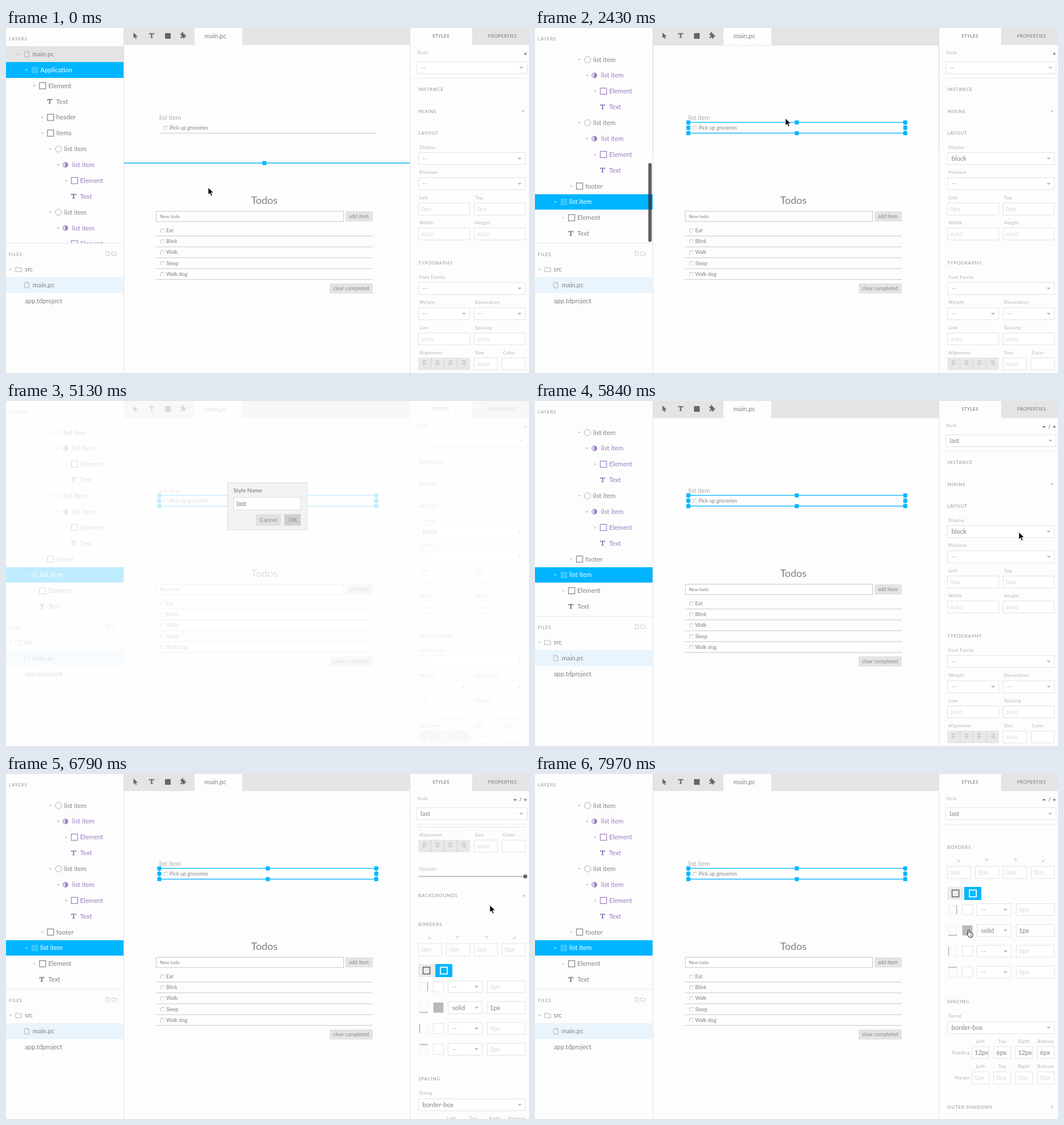
These frames come from a looping animation (921x608 px, 8000 ms). An HTML page:

```html
<!DOCTYPE html>
<html lang="en">
<head>
<meta charset="utf-8">
<title>Component editor</title>
<style>
html, body { margin: 0; width: 100%; height: 100%; overflow: hidden; background: #fdfdfd; }
svg { display: block; width: 100vw; height: 100vh; font-family: Lato, "Open Sans", sans-serif; }
.cap { letter-spacing: .8px; }
.lab { letter-spacing: .45px; }
</style>
</head>
<body>
<svg id="stage" viewBox="0 0 921 608" preserveAspectRatio="none"></svg>
<script>
const LOOP = 8000, BLUE = '#00b5ff', PURPLE = '#9a7cc0', GRAY = '#828282', PALE = '#dadada', EDGE = '#e2e2e2';
const RULE = '#c6c6c6', ROW = 27.87, TREE_SCROLL = 492;

// Drawing helpers; text y is the middle of the capitals.
const text = (s, x, y, size = 11.3, fill = GRAY, more = '') =>
  `<text x="${x}" y="${y + size * .35}" font-size="${size}" fill="${fill}" ${more}>${s}</text>`;
const cap = (s, x, y, fill = '#969696') => text(s, x, y, 8, fill, 'class="cap"');
const label = (s, x, y, more = '') => text(s, x, y, 8, '#afafaf', 'class="lab" ' + more);
const box = (x, y, w, h, fill, more = '') =>
  `<rect x="${x}" y="${y}" width="${w}" height="${h}" fill="${fill}" ${more}/>`;
const frame = (x, y, w, h, stroke = EDGE, fill = 'none', sw = 1) =>
  box(x + .5, y + .5, w - 1, h - 1, fill, `stroke="${stroke}" stroke-width="${sw}"`);
const path = (d, fill, more = '') => `<path d="${d}" fill="${fill}" ${more}/>`;
const line = (d, stroke, w = 1) => path(d, 'none', `stroke="${stroke}" stroke-width="${w}"`);
const at = (x, y, body, scale = 1) => `<g transform="translate(${x} ${y}) scale(${scale})">${body}</g>`;
const group = (id, body, more = '') => `<g id="${id}" ${more}>${body}</g>`;
const plus = (x, y, c = '#999') => line(`M${x - 2.5} ${y}h5M${x} ${y - 2.5}v5`, c);

const icons = {
  doc: c => line('M-3.5-5h5l2.5 2.5v7.5h-7.5zM1.5-5v2.5h2.5', c, .9),
  folder: c => line('M-5-4h4l1 1.5h5.5v6.5h-10.5z', c, .9),
  frame: c => frame(-6, -6, 12, 12, c, 'none', 1.2),
  comp: c => [[-5, -5], [1, -5], [-5, 1], [1, 1]].map(([x, y]) => frame(x, y, 4.5, 4.5, c, 'none', .9)).join(''),
  circle: c => `<circle r="5.5" fill="none" stroke="${c}"/>`,
  half: c => `<circle r="4.5" fill="#ddd4ea" stroke="${c}" stroke-width=".8"/>` + path('M0-4.5a4.5 4.5 0 0 1 0 9z', c),
  text: c => path('M-4.5-4.5h9v2.8h-1.2v-1.2h-2.2v5.9h1.2v1h-4.6v-1h1.2v-5.9h-2.2v1.2h-1.2z', c)
};
const twist = (x, y, open, c = '#cacaca') =>
  at(x, y, path(open ? 'M-2.7-1.3h5.4l-2.7 3.2z' : 'M-1.3-2.7v5.4l3-2.7z', c));

// Layer rows: name, depth, icon, open (undefined means no twist).
const instance = [['list item', 4, 'circle', 1], ['list item', 5, 'half', 1], ['Element', 6, 'frame', 0], ['Text', 6, 'text']];
const layers = [
  ['main.pc', 0, 'doc', 1], ['Application', 1, 'comp', 1], ['Element', 2, 'frame', 1], ['Text', 3, 'text'],
  ['header', 3, 'frame', 0], ['items', 3, 'frame', 1],
  ...Array(5).fill(instance).flat(),
  ['footer', 3, 'frame', 0], ['list item', 1, 'comp', 1], ['Element', 2, 'frame', 0], ['Text', 2, 'text']
];
const tree = (selected, scroll) => layers.map(([name, depth, icon, open], i) => {
  const y = 46 + i * ROW - scroll, x = 22 + depth * 14;
  const top = Math.round(y - ROW / 2), bottom = Math.round(y + ROW / 2);
  const on = i === selected, c = on ? '#fff' : depth > 4 ? PURPLE : GRAY;
  const bg = on ? BLUE : i === 0 ? '#e4e4e4' : '';
  const soft = on ? '#8fdcff' : icon === 'doc' || icon === 'circle' ? '#acacac' : c;
  return (bg ? box(0, top, 207.5, bottom - top, bg) : '') +
    (open === undefined ? '' : twist(x, y, open, on ? '#7fd6ff' : undefined)) +
    at(x + (icon === 'half' ? 12.5 : icon === 'text' ? 13 : 14.5), y, icons[icon](soft)) +
    text(name, x + 24.5, y, 11.3, c);
}).join('');

const sidebar = () => cap('LAYERS', 5, 19) +
  group('treeA', tree(1, 0), 'clip-path="url(#treeClip)"') +
  group('treeB', tree(27, TREE_SCROLL), 'clip-path="url(#treeClip)"') +
  box(199.5, 238, 6, 139, '#2d2d2d', 'id="bar" rx="3" opacity=".7"') +
  line('M0 379.5H207', '#e8e8e8') + cap('FILES', 5, 399) +
  at(179, 397.5, icons.doc('#b4b4b4'), .75) + at(190, 397.5, icons.folder('#b4b4b4'), .75) +
  twist(8, 425.5, 1) + at(22, 425.5, icons.folder('#acacac')) + text('src', 33, 425.5) +
  box(0, 439, 207, 28, '#e9f4fc') + at(36.5, 453, icons.doc('#acacac')) + text('main.pc', 47, 453) +
  text('app.tdproject', 33, 481) + line('M207.5 0V608', '#e2e2e2');

const checkbox = (x, y) => frame(x - 3.5, y - 3, 7, 7, '#eaeaea') + line(`M${x - 3} ${y + 3}v-4q0-2 2-2h4`, '#c0c0c0');
const button = (x, y, w, h, s, tx, size = 9.1, fill = '#e4e4e4') =>
  box(x, y, w, h, fill) + text(s, tx, y + h / 2, size, '#8a8a8a');

const canvasArea = () => box(208, 0, 503, 30, '#e4e4e4') + box(332, 0, 84, 30, '#fdfdfd') +
  at(224.5, 8, path('M0 0v10l2.4-2.2 1.5 3.4 1.7-.7-1.5-3.3h3.3z', '#666')) +
  at(256.5, 13.5, icons.text('#666')) + box(280, 9, 10, 10, '#666') +
  path('M307 10h2.6q-1-3 1-3t1 3h3v3q2.6-1 2.6 1.2t-2.6 1v3h-2.6q.4-2-1.2-2t-1.2 2h-2v-3q2 .4 2-1.2t-2-1.2z', '#666') +
  text('main.pc', 349.5, 14) +
  text('list item', 270, 158, 11, '#adadad') + checkbox(281.5, 176) +
  text('Pick up groceries', 288, 175.5, 9.1) + line('M270 185.3H652', RULE) +
  text('Todos', 455, 304, 18, GRAY, 'text-anchor="middle"') +
  frame(264, 322.5, 331, 19, RULE, '#fff') + text('New todo', 271, 332.5, 8.1) +
  button(598, 323, 48, 18, 'add item', 604) +
  ['Eat', 'Blink', 'Walk', 'Sleep', 'Walk dog'].map((s, i) => {
    const y = 357 + i * 19.15;
    return checkbox(275.5, y) + text(s, 282, y, 9.1) + line(`M264 ${y + 9.6}H646`, RULE);
  }).join('') +
  button(570, 450, 76, 18, 'clear completed', 576);

const field = (x, y, w, s, c = PALE) => frame(x, y - 11, w, 22, EDGE, '#fff') + text(s, x + 5, y, 11.2, c);
const select = (x, y, w, s = '--', c = '#a8a8a8') =>
  frame(x, y - 11, w, 22, EDGE, '#fff') + text(s, x + 7.5, y, 11.2, c) +
  path(`M${x + w - 14} ${y - 1.5}h7l-3.5 3.5z`, '#b8b8b8');

const alignIcons = () => [0, 1, 2, 3].map(i => {
  const x = 737 + i * 23;
  const rows = [7, 4, 7, 4].map((w, r) => {
    const shift = i === 1 ? (7 - w) / 2 : i === 3 ? 7 - w : 0;
    return `M${x - 3.5 + shift} ${586.5 + r * 2.5}h${w}`;
  }).join('');
  return line(rows, '#b0b0b0', .9) + (i ? line(`M${x - 11.5} 581v22`, '#d2d2d2') : '');
}).join('');

const columns = [726, 775, 824, 873];
const sideMarks = ['M742.5-8v16', 'M728 8.5h15', 'M728.5-8v16', 'M728-8.5h15'];
const borderRow = i => {
  const y = 840 + i * 36.7, set = i === 1;
  return frame(728, y - 8, 15, 17, '#ececec') + at(0, y, line(sideMarks[i], '#b0b0b0', 1.5)) +
    frame(752, y - 9.5, 19, 19, EDGE, set ? '#b9b9b9' : '#fff') +
    select(778, y, 61, set ? 'solid' : '--', set ? GRAY : undefined) +
    field(847, y, 68, set ? '1px' : '0px', set ? GRAY : undefined);
};
const edges = (name, y, values, c) => label(name, 766, y, 'text-anchor="end"') +
  ['Left', 'Top', 'Right', 'Bottom'].map((s, i) => {
    const x = 769 + i * 38.3;
    return label(s, x + 15.5, y - 20, 'text-anchor="middle"') + field(x, y, 31, values[i], c);
  }).join('');

const properties = () =>
  cap('INSTANCE', 726, 108) + cap('MIXINS', 726, 147) + plus(910.5, 146.5, '#c0c0c0') + cap('LAYOUT', 726, 185.5) +
  label('Display', 728, 210) + select(726, 230, 189, '') +
  group('dash', text('--', 733.5, 230, 11.2, '#a8a8a8')) + group('block', text('block', 733.5, 230, 11.2)) +
  label('Position', 728, 254) + select(726, 274.5, 189) +
  [['Left', 'Top', 299, '0px'], ['Width', 'Height', 343, 'auto']].map(([a, b, y, s]) =>
    label(a, 728, y) + label(b, 826, y) + field(726, y + 20, 91, s) + field(824, y + 20, 91, s)).join('') +
  cap('TYPOGRAPHY', 726, 414.5) + label('Font Family', 728, 439) + select(726, 459, 189) +
  label('Weight', 728, 483.5) + label('Decoration', 826, 483.5) + select(726, 503.5, 91) + select(824, 503.5, 91) +
  label('Line', 728, 528) + label('Spacing', 826, 528) + field(726, 548, 91, 'auto') + field(824, 548, 91, 'auto') +
  label('Alignment', 728, 572) + label('Size', 826, 572) + label('Color', 875, 572) +
  box(726, 581, 91, 22, '#e8e8e8') + alignIcons() + field(824, 592, 42, 'auto') + field(873, 592, 42, '') +
  label('Opacity', 728, 632) + line('M726 645.5H915', '#c0c0c0', 2) + '<circle cx="914.5" cy="645.5" r="3.5" fill="#666"/>' +
  cap('BACKGROUNDS', 726, 679.5) + plus(912, 679.5, '#c0c0c0') + cap('BORDERS', 726, 730.5) +
  ['v4h4', 'v-4h4', 'v-4h-4', 'v4h-4'].map((d, i) =>
    line(`M${columns[i] + (i < 2 ? 19 : 23)} ${d[1] === '-' ? 755 : 751}${d}`, '#b4b4b4') + field(columns[i], 774.5, 42, '0px')).join('') +
  box(726, 800, 30, 23, '#ececec') + box(756, 800, 30, 23, BLUE) +
  frame(734, 805, 13, 13, '#707070', 'none', 1.8) + frame(764.5, 805, 13, 13, '#fff', 'none', 1.8) +
  [0, 1, 2, 3].map(borderRow).join('') +
  cap('SPACING', 726, 1002.5) + label('Sizing', 728, 1027.5) + select(726, 1048, 189, 'border-box', GRAY) +
  edges('Padding', 1092, ['12px', '6px', '12px', '6px'], GRAY) +
  edges('Margin', 1136.5, ['0px', '0px', '0px', '0px']) +
  cap('OUTER SHADOWS', 726, 1188.5) + plus(910.5, 1188, '#c0c0c0');

const inspector = () => box(821, 0, 100, 30, '#e4e4e4') + line('M711.5 0V608', '#e2e2e2') +
  text('STYLES', 766, 14.5, 8, '#666', 'class="lab" text-anchor="middle"') +
  text('PROPERTIES', 874.5, 14.5, 8, '#777', 'class="lab" text-anchor="middle"') +
  label('Style', 724, 43) + plus(914.5, 45.5, '#666') +
  group('minus', line('M894 45.5h5', '#444', 1.5) + line('M904.5 48.5l3-7', '#888')) +
  select(723, 70, 195, '') + group('noStyle', text('--', 730, 70, 11.2, '#a8a8a8')) + group('lastStyle', text('last', 730, 70, 11.2)) +
  line('M712 88.5H921', '#eee') +
  `<g clip-path="url(#panelClip)">${group('panel', properties())}</g>`;

const handle = (x, y) => box(x - 3.5, y - 3.5, 7, 7, BLUE);
const overlays = () =>
  group('pickApp', line('M208 238H711', BLUE, 1.3) + handle(455, 238)) +
  group('hoverArt', line('M208.5 213V30.5H710.5V213', '#5fb4ff')) +
  group('hoverText', frame(288, 169, 67, 13, BLUE)) +
  group('hoverItem', frame(270, 166, 383, 20, BLUE)) +
  group('pickItem', box(270, 166.3, 382, 19, 'none', `stroke="${BLUE}" stroke-width="1.3"`) +
    [270, 461, 652].map(x => [166.3, 175.8, 185.3].map(y => x === 461 && y === 175.8 ? '' : handle(x, y)).join('')).join(''));

const dialog = () => box(0, 0, 921, 608, '#fff', 'id="veil"') +
  group('dialog', frame(389.5, 143.5, 141, 84, '#dadada', '#f3f3f3') + text('Style Name', 400.5, 157, 10.1, '#707070') +
    frame(400.5, 169.5, 119, 23, '#dcdcdc', '#fff') + text('', 406, 181, 11.2, '#707070', 'id="typed"') +
    button(440, 199.5, 44, 20, 'Cancel', 446.5, 10.3, '#e0e0e0') + button(490, 199.5, 29, 20, 'OK', 497.5, 10.3, '#cfcfcf'));

const pointers = () => group('pointer',
  group('arrow', path('M0 0v13l3-2.8 2.1 5 2.3-1-2.1-4.8h4.1z', '#000', 'stroke="#fff" stroke-width=".9"')) +
  group('beam', line('M-2.5-6q2 0 2.5 1 .5-1 2.5-1M0-5V5M-2.5 6q2 0 2.5-1 .5 1 2.5 1M-1.5 2h3', '#222', 1.2)) +
  group('hand', path('M-1.5.8q1.4-1.8 2.8 0v4q1-.8 1.9.3 1-.6 1.8.5 1.7-.4 2 1.2v2.4l-1 3.3h-5.8l-3.7-5.2q.2-1.6 1.7-.8l.3.4z', '#fff', 'stroke="#111"') +
    line('M2.3 8v2.5M4.3 8v2.5', '#333', .8)));

const clip = (id, x, y, w, h) => `<clipPath id="${id}">${box(x, y, w, h, '#000')}</clipPath>`;
const stage = document.getElementById('stage');
stage.innerHTML = `<defs>${clip('treeClip', 0, 32, 207.5, 347)}${clip('panelClip', 712, 89, 209, 519)}</defs>` +
  box(0, 0, 921, 608, '#fdfdfd') + sidebar() + canvasArea() + inspector() + overlays() + dialog() + pointers();
const part = Object.fromEntries([...stage.querySelectorAll('[id]')].map(el => [el.id, el]));

// Step tables: each value holds until the next time.
const pointerSteps = [
  [0, 356, 281], [270, 356, 280], [420, 355, 276], [540, 352, 262], [660, 348, 240], [770, 343, 220], [890, 339, 205],
  [1010, 337, 195], [1120, 336, 189], [1240, 335, 187], [1350, 334, 184], [1620, 370, 191], [1740, 415, 184],
  [1860, 440, 168], [2310, 441, 159], [2670, 450, 157], [2790, 500, 145], [2900, 600, 120], [3020, 730, 90],
  [3140, 840, 65], [3260, 900, 50], [3370, 915, 46], [4420, 0, 0, ''], [5460, 911, 50], [5660, 879, 105],
  [5840, 852, 231], [7140, 850, 236, 'beam'], [7260, 848, 238, 'beam'], [7370, 832, 244], [7490, 806, 253],
  [7610, 783, 262], [7730, 768, 266], [7850, 761, 268, 'hand'], [7970, 764, 275, 'hand']
];
const scrollSteps = [[0, 0], [6310, 40], [6430, 140], [6550, 252], [6670, 370], [6780, 465], [6900, 535],
  [7020, 575], [7140, 594], [7260, 600], [7370, 601]];
const typeSteps = [[0, ''], [4540, 'l'], [4660, 'la'], [4780, 'las'], [5130, 'last']];
const veilSteps = [[0, 0], [3790, .35], [3910, .7], [4030, .75], [5340, .35], [5460, 0]];
const dialogSteps = [[0, 0], [3790, .5], [3910, 1], [5340, .5], [5460, 0]];
const barSteps = [[0, 0], [2310, .75], [2670, .5], [2790, .25], [2900, 0]];
const artSteps = [[0, 0], [890, .6], [2310, .25], [2520, 0]];

const held = (steps, t) => steps.findLast(s => s[0] <= t);
const show = (id, on) => part[id].setAttribute('visibility', on ? 'visible' : 'hidden');
const fade = (id, steps, t) => part[id].setAttribute('opacity', held(steps, t)[1]);

function render(t) {
  const picked = t >= 2310, styled = t >= 5340;
  for (const id of ['treeA', 'pickApp', 'dash']) show(id, !picked);
  for (const id of ['treeB', 'pickItem', 'block']) show(id, picked);
  for (const id of ['minus', 'lastStyle']) show(id, styled);
  show('noStyle', !styled);
  show('hoverText', t >= 1240 && t < 1620);
  show('hoverItem', t >= 1620 && !picked);
  fade('hoverArt', artSteps, t);
  fade('bar', barSteps, t);
  fade('veil', veilSteps, t);
  fade('dialog', dialogSteps, t);
  part.typed.textContent = held(typeSteps, t)[1];
  part.panel.setAttribute('transform', `translate(0 ${-held(scrollSteps, t)[1]})`);
  const [, x, y, shape = 'arrow'] = held(pointerSteps, t);
  part.pointer.setAttribute('transform', `translate(${x} ${y})`);
  for (const id of ['arrow', 'beam', 'hand']) show(id, id === shape);
}

function tick() {
  render(performance.now() % LOOP);
  requestAnimationFrame(tick);
}
tick();
</script>
</body>
</html>
```
